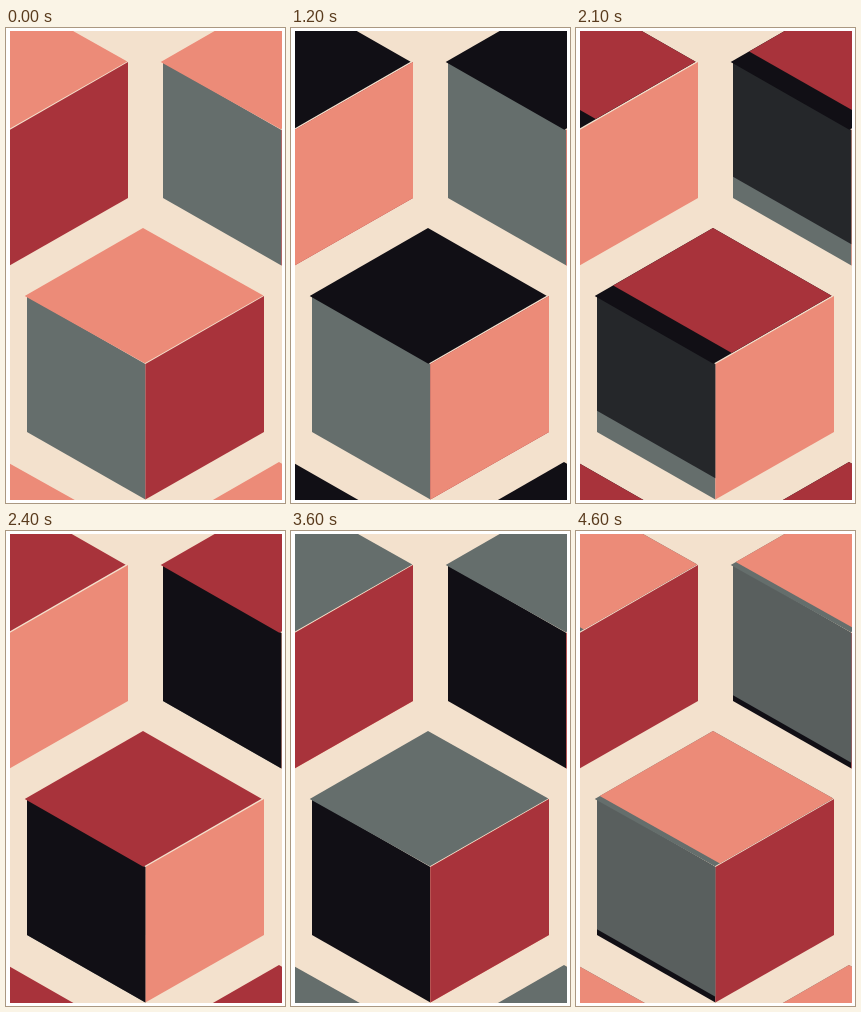
Recreate the animation shown at these times as an HTML page with a canvas. Size 279 by 475 pixels, loop 4.7 s.

```html
<!DOCTYPE html>
<html lang="en">
<head>
<meta charset="utf-8">
<title>Turning cubes</title>
<style>
  html, body { margin: 0; width: 100%; height: 100%; overflow: hidden; background: #fff; }
  canvas { display: block; width: 279px; height: 475px; }
</style>
</head>
<body>
<canvas id="stage" width="279" height="475"></canvas>
<script>
const ctx = document.getElementById('stage').getContext('2d');

const CREAM = '#f3e1cd', SALMON = '#ec8b78', RED = '#a8333b', GREY = '#656e6c', BLACK = '#110f15';
const LOOP = 4700, TURN = 1200, START = 300, STEP = 100;

// Cube colours at rest; each turn passes the top colour on to one side.
const poses = [
  { top: SALMON, left: GREY, right: RED },
  { top: BLACK, left: GREY, right: SALMON },
  { top: RED, left: BLACK, right: SALMON },
  { top: GREY, left: BLACK, right: RED }
];
const cubes = [[0, 0], [-136, -234], [136, -234], [-136, 234], [136, 234]];

// Corners run: start edge (two points), then end edge (two points).
const leftFace = [[21, 268], [139.4, 336], [139.4, 471.5], [21, 404]];
const rightFace = [[139.4, 336], [258, 268], [258, 404], [139.4, 471.5]];

function topFace(color, fromRight) {
  const wide = color === SALMON || color === GREY;
  const apex = [137, 200], west = [18.7, 268];
  const south = wide ? [138.8, 335.3] : [137.3, 335.7];
  const east = wide ? [257.3, 267.4] : [255.6, 267.8];
  return fromRight ? [apex, east, south, west] : [west, apex, east, south];
}

const clamp = v => Math.min(1, Math.max(0, v));
const mix = (a, b, k) => [a[0] + (b[0] - a[0]) * k, a[1] + (b[1] - a[1]) * k];

// Fills the part of a face between its start edge and fraction k.
function fill([a, b, c, d], color, k = 1, alpha = 1) {
  if (k <= 0) return;
  ctx.globalAlpha = alpha;
  ctx.fillStyle = color;
  ctx.beginPath();
  for (const p of [a, b, mix(b, c, k), mix(a, d, k)]) ctx.lineTo(p[0], p[1]);
  ctx.fill();
  ctx.globalAlpha = 1;
}

function drawCube(now, next, toLeft, slide, fade) {
  fill(leftFace, now.left);
  fill(rightFace, now.right);
  if (toLeft) fill(leftFace, next.left, slide, fade);
  else fill(rightFace, next.right, slide, fade);
  if (slide < 1) fill(topFace(now.top, toLeft), now.top);
  fill(topFace(next.top, toLeft), next.top, slide);
}

function draw(ms) {
  const time = Math.floor((ms % LOOP) / STEP) * STEP - START;
  const turn = Math.max(0, Math.floor(time / TURN));
  const local = time - turn * TURN;
  const u = clamp(local / 800);
  const slide = u * u * (3 - 2 * u);
  const fade = clamp((local + 150) / 1000);

  ctx.fillStyle = '#fff';
  ctx.fillRect(0, 0, 279, 475);
  ctx.save();
  ctx.beginPath();
  ctx.rect(4, 3, 272, 469);
  ctx.clip();
  ctx.fillStyle = CREAM;
  ctx.fillRect(4, 3, 272, 469);
  for (const [x, y] of cubes) {
    ctx.save();
    ctx.translate(x, y);
    drawCube(poses[turn], poses[(turn + 1) % 4], turn % 2 === 1, slide, fade);
    ctx.restore();
  }
  ctx.restore();
}

const begin = performance.now();
function tick() {
  draw(performance.now() - begin);
  requestAnimationFrame(tick);
}
tick();
</script>
</body>
</html>
```
